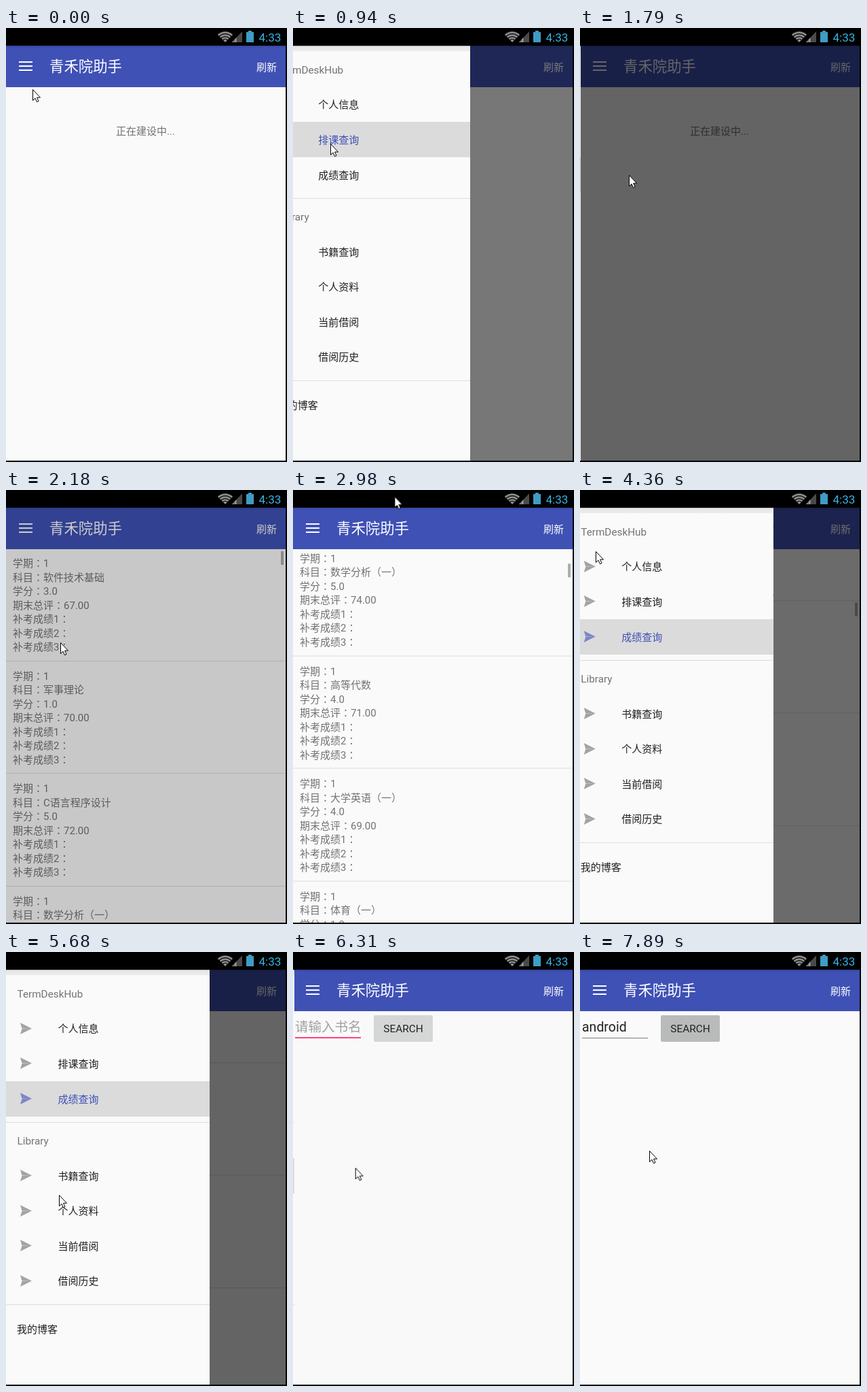
Write an HTML page that moves like this. It is 414x638 px and loops after 8 s.

```html
<!DOCTYPE html>
<html lang="zh-Hans">
<head>
<meta charset="utf-8">
<title>App demo</title>
<style>
@property --scroll { syntax: "<number>"; inherits: true; initial-value: 0; }

html, body { margin: 0; width: 100%; height: 100%; overflow: hidden; background: #000; }
body { font: 15px/20px Roboto, "Noto Sans CJK SC", sans-serif; color: #737373; white-space: nowrap; }
#stage { position: relative; width: 414px; height: 638px; overflow: hidden; background: #000; }
#stage div, #stage svg { position: absolute; }

#screen { left: 0; top: 26px; width: 412px; height: 610px; overflow: hidden; background: #fafafa; }
#bar { width: 412px; height: 61px; color: #fff;
  background: linear-gradient(#34449c, #3f51b5 3px); }
#title { left: 64px; top: 15px; font-size: 21.4px; line-height: 32px; }
#refresh { left: 369px; top: 21.5px; }

.page { top: 60px; width: 412px; height: 550px; overflow: hidden; visibility: hidden; }
.page.on { visibility: visible; }
#wip p { position: absolute; margin: 0; left: 162px; top: 55.5px; }

#rows { transform: translateY(calc(var(--scroll) * -1px)); width: 412px; }
#rows section { box-sizing: border-box; height: 165.67px; padding: 12px 10px 0;
  line-height: 20.5px; border-bottom: 1px solid #dcdcdc; }
#thumb { left: 404.5px; top: 4px; width: 4px; height: 20px; background: #acacac;
  transform: translateY(calc(var(--scroll) * .0364px)); }

#field { left: 3px; top: 12px; width: 97px; height: 26px; font-size: 19.5px; line-height: 26px; color: #212121; }
#hint { color: #a2a2a2; }
#caret { display: inline-block; width: 2px; height: 25px; background: #ff4081; vertical-align: middle; margin-top: -3px; }
#line { left: 3px; top: 39px; width: 97px; height: 2px; background: #ff4081; }
#button { left: 119px; top: 7px; width: 87px; height: 39px; border-radius: 2px; background: #d6d7d7;
  color: #212121; font-size: 15.4px; line-height: 40px; text-align: center; }
.done #line { top: 40px; height: 1px; background: #7d7d7d; }
.done #button { background: #b9baba; }

#scrim { width: 412px; height: 610px; background: #000; }
#drawer { width: 300px; height: 610px; background: #fafafa; }
#drawer .strip { width: 300px; height: 8px; background: linear-gradient(#b4b4b4 1px, #e6e6e6 1px, #ececec); }
.head { left: 16.5px; font-size: 15.3px; }
.rule { width: 300px; height: 1px; background: #dedede; }
.item { width: 300px; height: 52px; line-height: 52px; color: #212121; font-weight: 500; }
.item span { position: absolute; left: 76.5px; top: .5px; }
.item svg { left: 21px; top: 17px; fill: #a3a3a3; }
.item.on { background: #dbdbdb; color: #3f51b5; }
.item.on svg { fill: #7c87c8; }

#clock { left: 372.5px; top: 3.5px; font-size: 17px; color: #33b5e5; }

#cursor, #drawer, #scrim, #list, #thumb { animation: 8s linear infinite paused; }
#cursor { animation-name: point; }
#drawer { animation-name: slide; }
#scrim { animation-name: dim; }
#list { animation-name: scroll; }
#thumb { animation-name: fade; }

/* The drawer eases out like a quintic, both ways */
#drawer, #scrim { --settle: cubic-bezier(.22, 1, .36, 1); }

@keyframes point {
  0%, 1.8% { transform: translate(39px, 90px); }
  5.8%, 8.5% { transform: translate(28px, 57px); }
  11.75% { transform: translate(55px, 170px); }
  13.75% { transform: translate(64px, 203px); }
  15.5%, 25% { transform: translate(72px, 216px); }
  27.25% { transform: translate(80px, 224px); }
  31% { transform: translate(140px, 500px); }
  35.6% { transform: translate(150px, 9px); }
  40.625% { transform: translate(60px, 42px); }
  45.5%, 50.5% { transform: translate(22px, 59px); }
  54.5% { transform: translate(23px, 90px); }
  61.25% { transform: translate(74px, 372px); }
  71% { transform: translate(78px, 357px); }
  72.5%, 75% { transform: translate(83px, 338px); }
  81.875%, 100% { transform: translate(102px, 292px); }
}
@keyframes slide {
  0%, 8.5%, 21.875%, 50.45%, 78.75%, 100% {
    transform: translateX(-300px); animation-timing-function: var(--settle);
  }
  14.125%, 16.25%, 56.075%, 73.125% {
    transform: translateX(0); animation-timing-function: var(--settle);
  }
}
@keyframes dim {
  0%, 8.5%, 29%, 50.45%, 78.75%, 100% { opacity: 0; animation-timing-function: var(--settle); }
  14.125%, 56.075%, 73.125% { opacity: .6; animation-timing-function: var(--settle); }
  25.2% { opacity: .6; }
  27.25% { opacity: .2; }
}
@keyframes scroll {
  0%, 31% { --scroll: 0; }
  35.6% { --scroll: 491; animation-timing-function: cubic-bezier(.25, .6, .6, .92); }
  45.5% { --scroll: 1980; animation-timing-function: ease-out; }
  51%, 100% { --scroll: 2076.7; }
}
@keyframes fade {
  0%, 54.5% { opacity: 1; }
  59%, 100% { opacity: 0; }
}
</style>
</head>
<body>
<div id="stage">
  <svg width="414" height="26" fill="none">
    <path d="M312.8 10.8A14.5 14.5 0 0 1 333.2 10.8M315.6 13.6A10.5 10.5 0 0 1 330.4 13.6M318.4 16.4A6.5 6.5 0 0 1 327.6 16.4" stroke="#8c8c8c" stroke-width="2.7"/>
    <path d="M320.2 18.2A4 4 0 0 1 325.8 18.2L323 21Z" fill="#8c8c8c"/>
    <path d="M333 21H348V5Z" fill="#4a4a4a"/>
    <path d="M333 21H335.5V18.3ZM336.5 21H339.5V14L336.5 17.2Z" fill="#9a9a9a"/>
    <path d="M354 6H357V4H362V6H365V21H354Z" fill="#3f9cc4"/>
  </svg>
  <div id="clock">4:33</div>

  <div id="screen">
    <div id="wip" class="page"><p>正在建设中...</p></div>
    <div id="list" class="page"><div id="rows"></div><div id="thumb"></div></div>
    <div id="search" class="page">
      <div id="field"><span id="hint">请输入书名</span><span id="typed"></span><span id="caret"></span></div>
      <div id="line"></div>
      <div id="button">SEARCH</div>
    </div>
    <div id="bar">
      <svg width="50" height="60" fill="#fff"><path d="M19 23h20v2h-20zM19 29h20v2h-20zM19 35h20v2h-20z"/></svg>
      <div id="title">青禾院助手</div>
      <div id="refresh">刷新</div>
    </div>
    <div id="scrim"></div>
    <div id="drawer"><div class="strip"></div></div>
  </div>

  <svg id="cursor" width="14" height="21" style="overflow:visible">
    <path d="M.5 .5V16.5L4 13.2 6.5 18.7 9 17.6 6.6 12.2H11.5Z" fill="#fff" stroke="#000"/>
  </svg>
</div>

<script>
const LOOP = 8000;
const $ = id => document.getElementById(id);

// Drawer: [kind, top, label]
const menu = [
  ["head", 26, "TermDeskHub"],
  ["item", 60.5, "个人信息"], ["item", 112, "排课查询"], ["item", 164, "成绩查询"],
  ["rule", 224, ""],
  ["head", 242, "Library"],
  ["item", 277, "书籍查询"], ["item", 328.5, "个人资料"], ["item", 380, "当前借阅"], ["item", 431.5, "借阅历史"],
  ["rule", 492, ""],
  ["item", 502, "我的博客"]
];
const arrow = '<svg width="18" height="18"><path d="M0 0L17 8.4H2.5ZM0 17L17 8.6 2.5 8.9Z"/></svg>';
for (const [kind, top, label] of menu) {
  const el = document.createElement("div");
  const plain = label === "我的博客";
  el.className = kind;
  el.style.top = top + "px";
  el.innerHTML = kind === "item"
    ? (plain ? "" : arrow) + `<span${plain ? ' style="left:16px"' : ""}>${label}</span>`
    : label;
  $("drawer").append(el);
}
const items = [...document.querySelectorAll(".item")];

// Grades: term|course|credit|score
const grades = `1|软件技术基础|3.0|67.00
1|军事理论|1.0|70.00
1|C语言程序设计|5.0|72.00
1|数学分析（一）|5.0|74.00
1|高等代数|4.0|71.00
1|大学英语（一）|4.0|69.00
1|体育（一）|1.0|80.00
1|计算机导论|2.0|75.00
1|军事训练|2.0|82.00
2|数学分析（二）|5.0|70.00
2|大学英语（二）|4.0|68.00
2|体育（二）|1.0|79.00
2|形势与政策|0.5|67.00
2|廉洁修身|1.0|76.00
2|思想道德修养与法律基础|3.0|78.00
2|青年学生健康教育|1.0|81.00`;
const labels = ["学期", "科目", "学分", "期末总评", "补考成绩1", "补考成绩2", "补考成绩3"];
// Traditional Chinese glyphs centre the colon in its cell
const colon = '<span lang="zh-Hant">：</span>';
$("rows").innerHTML = grades.split("\n").map(row => {
  const cells = row.split("|");
  return `<section>${labels.map((name, i) => name + colon + (cells[i] || "")).join("<br>")}</section>`;
}).join("");

// The screen refreshes in bursts: [first, last, count]
const bursts = [
  [0, 0, 1], [150, 940, 6], [1100, 1100, 1], [1240, 2180, 7], [2320, 3250, 8], [3370, 3640, 3],
  [3790, 4360, 5], [4480, 4900, 4], [5680, 5680, 1], [5800, 6550, 6], [6980, 7590, 5], [7890, 7890, 1]
];
const ticks = bursts.flatMap(([a, b, n]) =>
  Array.from({ length: n }, (_, i) => Math.floor(a + (b - a) * i / Math.max(1, n - 1))));

const at = (t, steps) => steps.reduce((value, [start, next]) => t >= start ? next : value, null);
const pages = [[0, "wip"], [1860, "list"], [6000, "search"]];
const picks = [[0, 1], [1240, 2], [5850, 3]];
const typing = [[0, 0], [6980, 1], [7130, 2], [7280, 4], [7430, 5], [7590, 7]];

function draw(t) {
  const page = at(t, pages), pick = at(t, picks), count = at(t, typing);
  for (const [, id] of pages) $(id).classList.toggle("on", id === page);
  items.forEach((el, i) => el.classList.toggle("on", i === pick));
  $("typed").textContent = "android".slice(0, count);
  $("hint").style.display = count ? "none" : "";
  $("caret").style.display = count && t < 7890 ? "" : "none";
  $("search").classList.toggle("done", t >= 7890);
  for (const a of motions) a.currentTime = t;
}

const motions = document.getAnimations();
const start = performance.now();
let shown = -1;
function loop() {
  const now = (performance.now() - start) % LOOP;
  const t = ticks.findLast(tick => tick <= now);
  if (t !== shown) draw(shown = t);
  requestAnimationFrame(loop);
}
loop();
</script>
</body>
</html>
```
